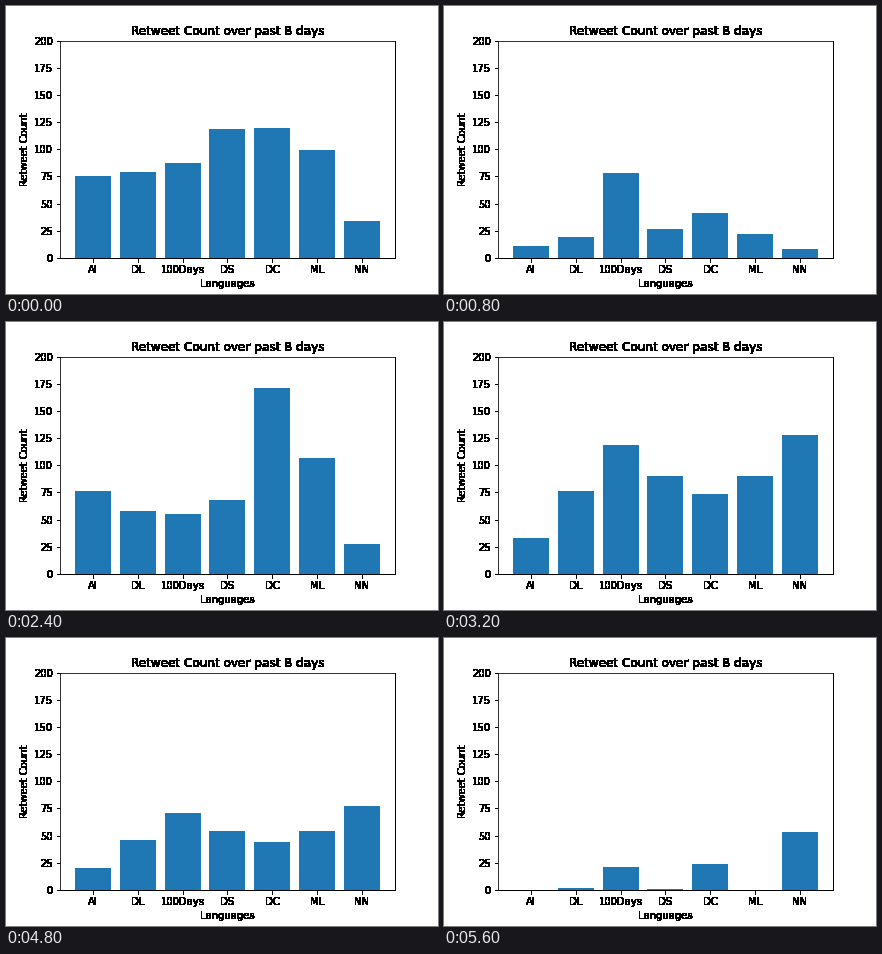
These frames come from a looping animation (432 px wide and 288 px high, 6400 ms). A matplotlib script:

```python
import matplotlib.pyplot as plt
import numpy as np
from matplotlib.animation import FuncAnimation

TAGS = ["AI", "DL", "100Days", "DS", "DC", "ML", "NN"]
STEP_MS = 800

# Counts per tag on the key days; the last day has only just begun.
busy = np.array([75, 79, 87, 119, 120, 99, 34])
quiet = np.array([11, 19, 78, 27, 41, 22, 8])
rise = np.array([76, 58, 55, 68, 171, 107, 28])
steady = np.array([33, 76, 119, 90, 74, 90, 128])
peak = np.array([4, 12, 137, 84, 210, 52, 67])
start = np.array([0, 2, 21, 1, 24, 0, 53])


def echo(day, level):
    """A day with the same shape as another, at a lower level."""
    return np.round(day * level)


DAYS = [busy, quiet, echo(quiet, 0.9), rise,
        steady, peak, echo(steady, 0.6), start]


def harden(img, dpi):
    """Make every touched pixel opaque, giving heavy text without soft edges."""
    img = img.copy()
    img[..., 3] = img[..., 3] > 0
    return img, 0, 0


plt.rcParams.update({"font.family": "DejaVu Sans", "font.size": 10})
fig, ax = plt.subplots(figsize=(6, 4), dpi=72, facecolor="white")
fig.subplots_adjust(left=0.125, right=0.9, bottom=0.125, top=0.88)

bars = ax.bar(TAGS, DAYS[0], color="#1f77b4")
ax.set_ylim(0, 200)
ax.set_title("Retweet Count over past 8 days")
ax.set_xlabel("Languages")
ax.set_ylabel("Retweet Count")
ax.set_agg_filter(harden)


def update(day):
    for bar, count in zip(bars, DAYS[day]):
        bar.set_height(count)
    return list(bars)


anim = FuncAnimation(fig, update, frames=len(DAYS), interval=STEP_MS,
                     repeat=True, repeat_delay=0, blit=False)
plt.show()
```
